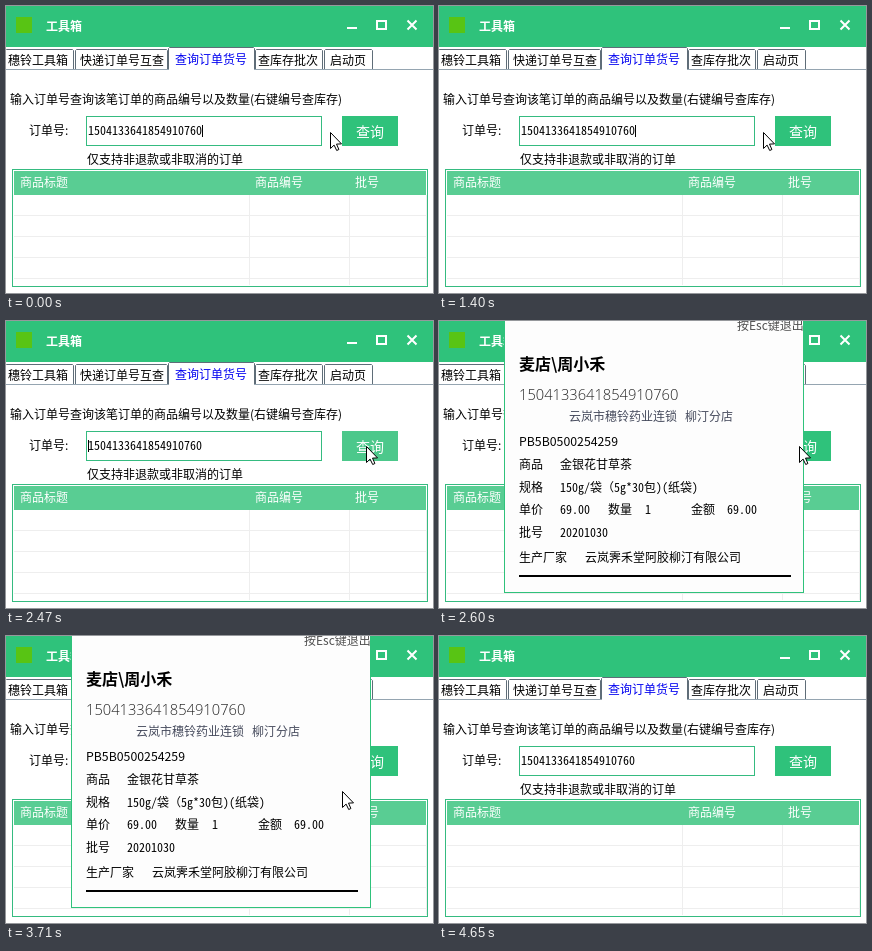
Write an HTML page with a canvas that moves like this. It is 427x287 px and loops after 4.95 s.

```html
<!DOCTYPE html>
<html lang="zh-CN">
<head>
<meta charset="utf-8">
<title>工具箱</title>
<style>
  html, body { margin: 0; width: 100%; height: 100%; overflow: hidden; background: #fff; }
  canvas { display: block; width: 427px; height: 287px; }
</style>
</head>
<body>
<canvas id="stage" width="427" height="287"></canvas>
<script>
const ctx = document.getElementById('stage').getContext('2d');
const LOOP = 4950;
const GREEN = '#2fc27b', HOVER = '#4cc88b', HEADER = '#59cd93', EDGE = '#35bb80';
const SANS = '"Noto Sans CJK SC", "Noto Sans CJK", sans-serif';
const MONO = '"Noto Sans Mono CJK SC", "Noto Sans CJK SC", monospace';
const ORDER = '1504133641854910760';

// Each entry: start time, then the value held until the next entry.
const pointer = [
  [0, 324, 126], [120, 357, 125], [980, 366, 130], [1110, 356, 132],
  [1250, 347, 127], [1400, 324, 126], [1520, 275, 124], [1640, 260, 125],
  [1760, 300, 126], [1910, 340, 126], [2040, 352, 126], [2320, 360, 125],
  [3150, 357, 131], [3430, 359, 162], [3710, 336, 155], [4380, 331, 178],
  [4500, 369, 221], [4650, null]
];
const caret = [[0, 196], [540, null], [1110, 196], [2190, null], [2470, 82], [4650, null]];
const hover = [[0, false], [270, true], [1400, false], [2040, true], [2600, false]];
const popup = [[0, false], [2600, true], [4230, false]];

function valueAt(track, t) {
  return track.filter(step => step[0] <= t).pop().slice(1);
}

function box(x, y, w, h, color) {
  ctx.fillStyle = color;
  ctx.fillRect(x, y, w, h);
}

function frame(x, y, w, h, color, width = 1) {
  ctx.strokeStyle = color;
  ctx.lineWidth = width;
  ctx.strokeRect(x + width / 2, y + width / 2, w - width, h - width);
}

function label(text, x, y, color = '#000', font = '12px ' + SANS) {
  ctx.font = font;
  ctx.fillStyle = color;
  ctx.fillText(text, x, y);
}

const mono = (text, x, y) => label(text, x, y, '#000', '12px ' + MONO);

function tab(text, x, right, textX, active) {
  const top = active ? 41 : 43;
  ctx.beginPath();
  ctx.moveTo(x + .5, 63);
  ctx.lineTo(x + .5, top + 1.5);
  ctx.lineTo(x + 1.5, top + .5);
  ctx.lineTo(right - 1.5, top + .5);
  ctx.lineTo(right - .5, top + 1.5);
  ctx.lineTo(right - .5, 63);
  ctx.fillStyle = '#fff';
  ctx.fill();
  ctx.strokeStyle = '#5f6d78';
  ctx.lineWidth = 1;
  ctx.stroke();
  if (active) box(x + 1, 62, right - x - 2, 3, '#fff');
  label(text, textX, active ? 58 : 59, active ? '#0000f0' : '#000');
}

function drawTitleBar() {
  box(0, 0, 427, 41, GREEN);
  box(10, 11, 16, 16, '#58c414');
  label('工具箱', 40, 25, '#fff', 'bold 12px ' + SANS);
  box(341, 21, 10, 2, '#fff');
  frame(370, 14, 11, 10, '#fff', 2);
  ctx.beginPath();
  ctx.moveTo(401.5, 14.5);
  ctx.lineTo(410.5, 23.5);
  ctx.moveTo(410.5, 14.5);
  ctx.lineTo(401.5, 23.5);
  ctx.stroke();
}

function drawTabs() {
  box(0, 63, 427, 1, '#95a5b1');
  tab('穗铃工具箱', -1, 68, 2);
  tab('快递订单号互查', 69, 162, 74);
  tab('查库存批次', 249, 317, 252);
  tab('启动页', 318, 367, 324);
  tab('查询订单货号', 162, 249, 169, true);
}

function drawTable() {
  frame(6, 163, 416, 118, EDGE);
  box(8, 165, 412, 24, HEADER);
  for (let y = 209; y < 279; y += 21) box(8, y, 412, 1, '#eeeeee');
  for (const x of [243, 343, 420]) box(x, 189, 1, 90, '#eeeeee');
  label('商品标题', 14, 181, '#fff');
  label('商品编号', 249, 181, '#fff');
  label('批号', 349, 181, '#fff');
}

function drawWindow(isHover, caretX) {
  box(0, 0, 427, 287, '#fff');
  drawTitleBar();
  drawTabs();
  label('输入订单号查询该笔订单的商品编号以及数量(右键编号查库存)', 4, 98);
  label('订单号:', 23, 129);
  frame(80, 110, 236, 30, EDGE);
  mono(ORDER, 82, 129);
  if (caretX !== null) box(caretX, 119, 1, 12, '#000');
  box(336, 110, 56, 30, isHover ? HOVER : GREEN);
  label('查询', 350, 131, '#fff', '14px ' + SANS);
  label('仅支持非退款或非取消的订单', 81, 158);
  drawTable();
}

function drawPopup() {
  box(65, 0, 300, 272, '#fdfdfd');
  frame(65, -2, 300, 274, GREEN);
  label('按Esc键退出', 298, 9, '#505050');
  label('麦店\\周小禾', 80, 49, '#000', 'bold 16px ' + SANS);
  label(ORDER, 80, 79, '#222', '300 14.7px "Open Sans", sans-serif');
  label('云岚市穗铃药业连锁', 130, 100, '#454a5c');
  label('柳汀分店', 246, 100, '#454a5c');
  label('PB5B0500254259', 80, 125, '#000', '12.3px ' + SANS);
  mono('商品', 80, 148);
  mono('金银花甘草茶', 121, 148);
  mono('规格', 80, 171);
  mono('150g/袋（5g*30包)(纸袋)', 121, 171);
  mono('单价', 80, 193);
  mono('69.00', 121, 193);
  mono('数量', 169, 193);
  mono('1', 206, 193);
  mono('金额', 252, 193);
  mono('69.00', 288, 193);
  mono('批号', 80, 216);
  mono('20201030', 121, 216);
  mono('生产厂家', 80, 241);
  mono('云岚霁禾堂阿胶柳汀有限公司', 146, 241);
  box(80, 254, 272, 2, '#000');
}

function drawPointer(x, y) {
  const outline = [[0, 0], [0, 16], [3.6, 12.6], [6.2, 18], [8.4, 17], [6, 11.6], [11, 11.4]];
  ctx.beginPath();
  for (const [dx, dy] of outline) ctx.lineTo(x + dx + .5, y + dy + .5);
  ctx.closePath();
  ctx.fillStyle = '#fff';
  ctx.fill();
  ctx.strokeStyle = '#000';
  ctx.lineWidth = 1;
  ctx.stroke();
}

function render() {
  const t = performance.now() % LOOP;
  drawWindow(valueAt(hover, t)[0], valueAt(caret, t)[0]);
  if (valueAt(popup, t)[0]) drawPopup();
  const [x, y] = valueAt(pointer, t);
  if (x !== null) drawPointer(x, y);
  requestAnimationFrame(render);
}
render();
</script>
</body>
</html>
```
